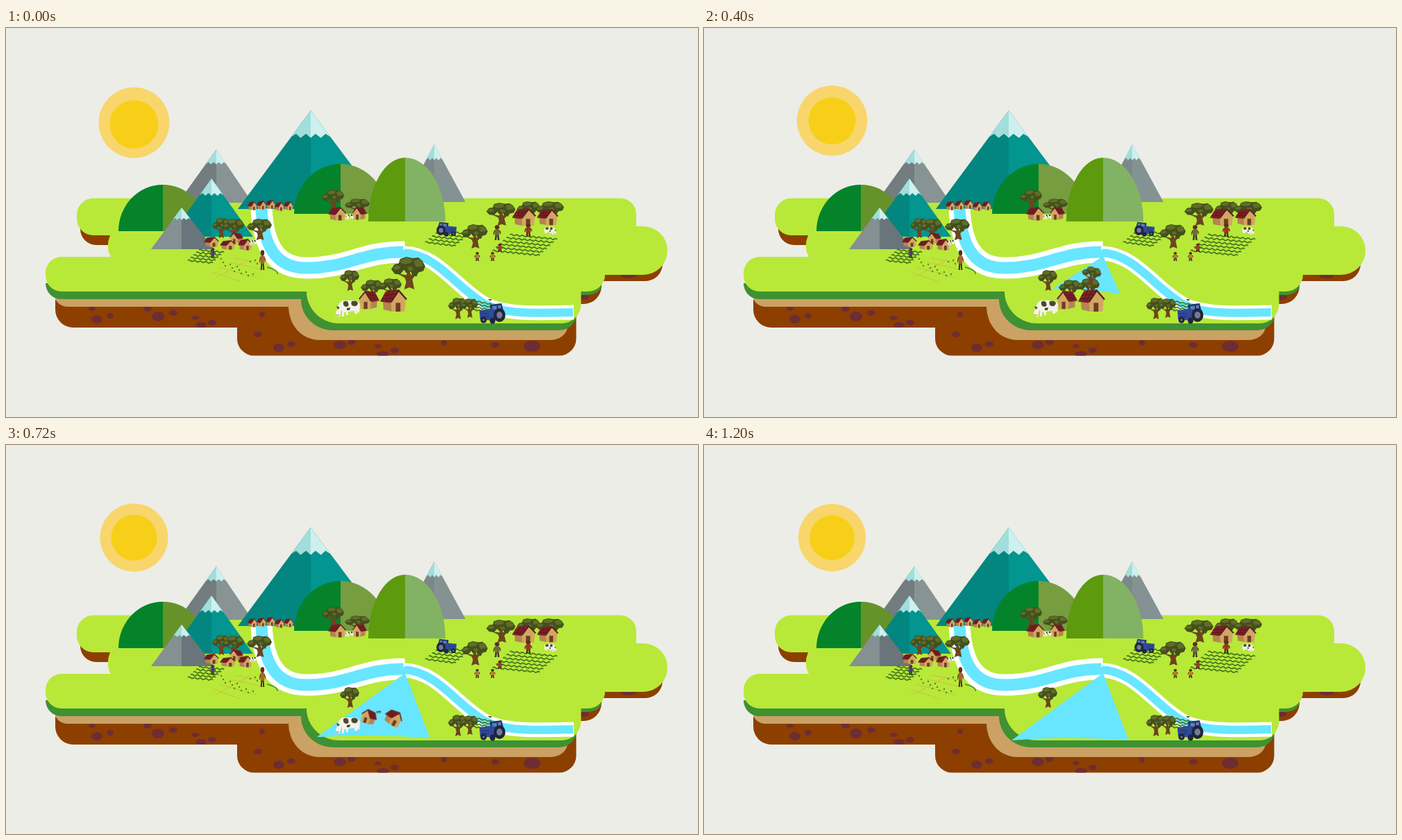
Write an HTML page that moves like this. It is 997 by 561 pixels and loops after 1240 ms.

```html
<!DOCTYPE html>
<html lang="en">
<head>
<meta charset="utf-8">
<title>Valley flood</title>
<style>
html, body { margin: 0; width: 100%; height: 100%; overflow: hidden; background: #ecede7; }
svg { display: block; width: 100vw; height: 100vh; }
.halo, .disc, .flood, .out { animation: 1240ms linear infinite; }
.out { transform-box: fill-box; transform-origin: center; }
.halo { animation-name: halo; }
.disc { animation-name: disc; }
.flood { animation-name: flood; }
.oak { animation-name: oak; }
.grove { animation-name: grove; }
.cabin { animation-name: cabin; }
.barn { animation-name: barn; }
.ox { animation-name: ox; }
@keyframes halo {
  0% { cy: 136.5px; r: 51px; }
  12.9% { cy: 134.5px; r: 50px; }
  32.26% { cy: 133.6px; r: 50.7px; }
  51.61% { cy: 133.6px; r: 49.2px; }
  67.74% { cy: 133.6px; r: 48.8px; }
  80.65% { cy: 133.6px; r: 49.3px; }
  96.77%, 100% { cy: 133.6px; r: 48.6px; }
}
@keyframes disc {
  0% { cy: 139px; r: 35px; }
  12.9% { cy: 135.6px; r: 32.5px; }
  32.26% { cy: 133.8px; r: 34px; }
  51.61% { cy: 133.6px; r: 33.5px; }
  67.74% { cy: 133.7px; r: 32.6px; }
  80.65% { cy: 133.8px; r: 32.2px; }
  96.77%, 100% { cy: 133.7px; r: 32.4px; }
}
@keyframes flood {
  0% { d: path("M575 325 L560 328 Q568 329 575 329 Z"); }
  12.9% { d: path("M575 329 L541 338 Q560 337 577 341 Z"); }
  32.26% { d: path("M575 329 L502 376 Q552 375 600 384 Z"); }
  51.61% { d: path("M575 329 L451 418 Q530 414 610 420 Z"); }
  67.74%, 100% { d: path("M575 329 L443 426 Q527 419 612 426 Z"); }
}
@keyframes oak {
  0%, 12.9% { transform: none; }
  32.26% { transform: translate(-22px, 4px) scale(.58) rotate(12deg); }
  45%, 100% { transform: translate(-32px, 6px) scale(0) rotate(25deg); }
}
@keyframes grove {
  0%, 34% { transform: none; }
  51.61% { transform: translate(-3px, 7px) scale(.4); }
  61%, 100% { transform: translate(-4px, 9px) scale(0); }
}
@keyframes cabin {
  0%, 53% { transform: none; }
  67.74% { transform: scale(.42) rotate(50deg); }
  78%, 100% { transform: scale(0) rotate(90deg); }
}
@keyframes barn {
  0%, 52% { transform: none; }
  67.74% { transform: scale(.2) rotate(70deg); }
  73%, 100% { transform: scale(0) rotate(90deg); }
}
@keyframes ox {
  0%, 58% { transform: none; }
  67.74% { transform: translateX(2px) rotate(25deg); }
  80.65% { transform: translate(1px, 2px) scale(.52) rotate(70deg); }
  91%, 100% { transform: scale(0) rotate(90deg); }
}
</style>
</head>
<body>
<svg viewBox="0 0 997 561" xmlns="http://www.w3.org/2000/svg">
  <defs>
    <symbol id="tree" viewBox="0 0 50 48" preserveAspectRatio="none">
      <path d="M19 48 L22 37 L20 31 L8 24 L22 27 L26 18 L29 27 L41 20 L31 33 L34 48 L27 45 Z" fill="#6b451f"/>
      <path d="M0 18 L5 11 L11 10 L13 3 L22 0 L32 2 L40 1 L46 6 L50 14 L47 21 L40 23 L37 29 L31 27 L29 22 L22 24 L19 19 L13 26 L5 25 Z" fill="#444f1b"/>
      <path d="M13 5 L23 1 L31 4 L29 9 L20 11 L14 9 Z M33 6 L41 3 L47 9 L46 14 L36 15 Z M2 16 L8 12 L14 14 L11 19 L4 19 Z M23 15 L30 14 L33 19 L26 21 Z" fill="#5f6c2b"/>
    </symbol>
    <symbol id="house" viewBox="0 0 40 34" preserveAspectRatio="none">
      <path d="M4 15 L18 15 V33 L5 30 Z" fill="#b4854e"/>
      <path d="M16 18 L28 3 L38 15 L36 33 H17 Z" fill="#d3a562"/>
      <path d="M0 18 L8 3 L28 0 L15 20 Z" fill="#7d2126"/>
      <path d="M5 9 L23 7 M2 14 L19 13 M14 2 L8 18 M21 1 L12 18" stroke="#55151c" fill="none"/>
      <path d="M27 1 L39 15 M28 1 L16 19" stroke="#571f1c" stroke-width="2.4"/>
      <path d="M23 20 H30 V33 H23 Z" fill="#6b3e20"/>
    </symbol>
    <symbol id="cow" viewBox="0 0 36 27" preserveAspectRatio="none">
      <path d="M9 16 V25 H12 V19 H15 V23 H18 V18 L27 17 V21 H31 L32 18 L34 20 L35 8 Q33 1 24 2 L10 2 Q4 5 3 12 L0 20 Q1 26 6 25 L8 16 Z" fill="#f4f2ea"/>
      <path d="M11 4 Q16 1 18 5 Q20 11 15 11 Q10 10 11 4 M23 3 Q31 1 32 6 Q31 11 26 10 Q21 9 23 3 M16 13 l5 -1 l-1 4 l-4 0 M1 10 l5 2 l-3 3" fill="#4b4932"/>
      <path d="M1 23 l4 0" stroke="#dca7a0" stroke-width="2"/>
    </symbol>
    <symbol id="person" viewBox="0 0 10 22" preserveAspectRatio="none">
      <path d="M4 13 L3 22 M6 13 L7 22" stroke="#40302a" stroke-width="2.2"/>
      <path d="M2 7 Q5 4 8 7 L8 15 H2 Z" fill="currentColor"/>
      <path d="M2 8 L0 14 M8 8 L10 13" stroke="#70401f" stroke-width="1.6"/>
      <circle cx="5" cy="3.2" r="3" fill="#5a301b"/>
    </symbol>
    <symbol id="tractor" viewBox="0 0 40 31" preserveAspectRatio="none">
      <path d="M16 3 L33 1 L36 13 H17 Z" fill="#24376f"/>
      <path d="M20 5 H26 V11 H19 Z M28 4 H32 V10 H28 Z" fill="#5f7fb8"/>
      <path d="M1 11 L19 9 L37 12 V22 L20 26 L2 24 Z" fill="#2f4b98"/>
      <path d="M3 16 H15 M4 20 H15" stroke="#243a7a" stroke-width="1.5"/>
      <g fill="#21253c"><ellipse cx="30" cy="18" rx="8.5" ry="10"/><circle cx="7" cy="25" r="4.5"/><ellipse cx="20" cy="26" rx="4" ry="4.5"/></g>
      <g fill="#727b9c"><ellipse cx="30" cy="18" rx="4.2" ry="5"/><circle cx="7" cy="25" r="1.6"/></g>
    </symbol>
    <clipPath id="soil">
      <path id="earth" d="M71 392 V406 A26 26 0 0 0 97 432 H333 V448 A24.5 24.5 0 0 0 357.500 472.500 H797 A24.500 24.500 0 0 0 821.500 448 V398 H832 A26 26 0 0 0 858 372 V365 H921 A25 25 0 0 0 946 340 H800 V385 Z M107 285 V290 A23 23 0 0 0 130 313 H160 V285 Z"/>
    </clipPath>
  </defs>

  <rect width="997" height="561" fill="#ecede7"/>
  <circle class="halo" cx="184.5" cy="136.5" r="51" fill="#f8d66c"/>
  <circle class="disc" cx="184.5" cy="139" r="35" fill="#f7cf18"/>

  <use href="#earth" fill="#8d3f00"/>
  <g id="rocks" clip-path="url(#soil)" fill="#6e2d33"/>
  <path d="M70 385 A19 17 0 0 0 89 402 H407 A44 48 0 0 0 451 450 H784 A25 20 0 0 0 809 430 L800 400 H450 L425 385 Z" fill="#cba164"/>
  <path d="M57 368 A22 23 0 0 0 79 391 H425 A46 45 0 0 0 471 436 H797 A25 24 0 0 0 822 412 L828 385 H838 Q855 384 858 372 H800 L450 370 Z" fill="#3f9132"/>
  <path d="M126 245.500 H885 A23 23 0 0 1 908 268.500 V286 H918 A35 35 0 0 1 918 356 H863 A25 24 0 0 1 838 380 H828.500 V398 A28 28 0 0 1 800 426 H480 A47 46 0 0 1 433 380 H80 A23 23 0 0 1 57 357 V353 A23 23 0 0 1 80 330 H151 Q143 316 150 299 H126 A24 24 0 0 1 102 275 V269.500 A24 24 0 0 1 126 245.500 Z" fill="#b8e938"/>

  <g id="hills"/>

  <g fill="none">
    <path id="bend" d="M368 261 C371 316 390 346 432 346 C490 347 515 322 574 323" stroke="#fff" stroke-width="31"/>
    <path d="M368 261 C371 316 390 346 432 346 C490 347 515 322 574 323" stroke="#68e6ff" stroke-width="17"/>
    <path d="M574 325 C621 326 648 374 690 398 C720 414 770 411 818 410" stroke="#fff" stroke-width="21"/>
    <path d="M572 324 C621 326 648 374 690 398 C720 414 770 411 817 410" stroke="#68e6ff" stroke-width="12"/>
    <path d="M573.5 308 V320" stroke="#fff" stroke-width="2"/>
  </g>
  <path class="flood" d="M575 325 L560 328 Q568 329 575 329 Z" fill="#68e6ff"/>

  <g id="fields" fill="none" stroke="#44761d" stroke-width="1.7"/>
  <g fill="none" stroke="#d0b84a" stroke-width=".9">
    <path d="M298 352 L338 366 M306 345 L362 360 M322 338 L372 349 M328 332 L362 338 M302 360 L350 334"/>
    <path d="M376 345 Q392 349 391 355" stroke="#3f9132" stroke-width="1.6"/>
  </g>
  <g id="sprouts" fill="#4f8a1f"/>
  <g id="scene"/>

  <g class="out grove">
    <use href="#tree" x="511" y="363" width="32" height="30"/>
    <use href="#tree" x="537" y="361" width="33" height="30"/>
  </g>
  <g class="out oak"><use href="#tree" x="555" y="330" width="49" height="47"/></g>
  <g class="out cabin"><use href="#house" x="508" y="379" width="30" height="27" transform="matrix(-1 0 0 1 1046 0)"/></g>
  <g class="out barn"><use href="#house" x="539" y="377" width="39" height="33"/></g>
  <g class="out ox"><use href="#cow" x="475" y="391" width="36" height="27"/></g>
</svg>
<script>
const $ = id => document.getElementById(id);
const poly = (fill, ...pts) => `<polygon fill="${fill}" points="${pts.join(' ')}"/>`;

// Mountain with a jagged snow cap c pixels deep
function peak(x, y, l, r, base, c, dark, light) {
  const half = (end, rock, snow) => {
    const w = (end - x) * c / (base - y);
    const at = (fx, fy) => [x + w * fx, y + c * fy];
    return poly(rock, [x, y], [end, base], [x, base]) +
      poly(snow, [x, y], at(1, 1), at(.75, .88), at(.52, 1.04), at(.24, .88), at(0, 1.04));
  };
  return half(l, dark, '#a1dedc') + half(r, light, '#cef0ee');
}

function hill(x, y, l, r, base, dark, light) {
  const half = (end, fill) => `<path fill="${fill}" d="M${x} ${y} A${Math.abs(end - x)} ${base - y} 0 0 ${end > x ? 1 : 0} ${end} ${base} H${x} Z"/>`;
  return half(l, dark) + half(r, light);
}

$('hills').innerHTML =
  peak(303, 175, 248, 355, 252, 21, '#737c7e', '#879493') +
  peak(617, 168, 573, 662, 251, 22, '#7c8789', '#849293') +
  peak(439, 119, 334, 545, 261, 38, '#02867f', '#03958f') +
  hill(226, 226, 162, 290, 293, '#04832a', '#65932a') +
  hill(482, 196, 415, 549, 268, '#04832a', '#769d40') +
  hill(575, 187, 522, 633, 279, '#5d9a0d', '#82b263') +
  peak(296, 217, 236, 356, 301, 24, '#02867f', '#03958f') +
  peak(253, 259, 209, 300, 319, 17, '#849092', '#69757a');

$('rocks').innerHTML = [
  [131, 420, 8, 6], [150, 415, 5, 4], [124, 405, 5, 3], [204, 405, 6, 4], [219, 416, 9, 7],
  [241, 411, 6, 4], [273, 418, 6, 3], [281, 428, 8, 4], [297, 425, 6, 4], [369, 413, 4, 4],
  [363, 442, 6, 4], [393, 461, 8, 6], [411, 456, 6, 4], [481, 457, 9, 6], [498, 453, 6, 4],
  [536, 459, 5, 3], [543, 470, 9, 4], [560, 465, 6, 4], [631, 454, 4, 4], [705, 457, 6, 4],
  [758, 459, 12, 8], [831, 388, 9, 4], [897, 357, 11, 4]
].map(([x, y, a, b]) => `<ellipse cx="${x}" cy="${y}" rx="${a}" ry="${b}"/>`).join('');

// Rows of crops: wavy lines, each shifted by (dx, dy)
function field(x, y, len, n, dx, dy, slope) {
  let d = '';
  for (let i = 0; i < n; i++)
    d += `M${x + i * dx} ${y + i * dy} q2 ${slope - 2} 4 ${slope}` + ` t4 ${slope}`.repeat(len / 4);
  return `<path d="${d}"/>`;
}
$('fields').innerHTML =
  field(278, 320, 34, 5, -4, 3.8, .4) +
  field(624, 292, 40, 5, -5, 4.2, .5) +
  field(726, 298, 66, 6, -5, 4.6, .4) +
  field(672, 393, 26, 4, 0, 4.2, .8);

let sprouts = '';
for (let i = 0; i < 15; i++)
  sprouts += `<circle cx="${310 + i * 23 % 56}" cy="${333 + i * 11 % 25}" r="1.2"/>`;
$('sprouts').innerHTML = sprouts;

const put = (id, x, y, w, h, color = '#000') =>
  `<use href="#${id}" x="${x}" y="${y}" width="${w}" height="${h}" color="${color}"/>`;
const flip = (id, x, y, w, h) => `<g transform="matrix(-1 0 0 1 ${2 * x + w} 0)">${put(id, x, y, w, h)}</g>`;

let row = '';
for (let i = 0; i < 5; i++) row += put('house', 348 + i * 13, 248 + (i * 3 + 2) % 4, 14, 13);

$('scene').innerHTML = row +
  put('tree', 297, 274, 25, 29) + put('tree', 312, 275, 31, 30) + put('tree', 347, 275, 36, 31) +
  put('house', 285, 301, 22, 15) + flip('house', 322, 295, 20, 16) +
  put('house', 308, 306, 23, 14) + put('house', 334, 304, 21, 17) + put('cow', 351, 305, 10, 9) +
  put('person', 294, 317, 8, 15, '#34428c') + put('person', 365, 320, 9, 29, '#ac6432') +
  put('tree', 455, 233, 32, 30) + put('tree', 488, 246, 36, 25) +
  put('house', 464, 258, 26, 20) + flip('house', 499, 258, 21, 19) + put('cow', 489, 268, 12, 9) +
  flip('tractor', 619, 279, 31, 22) + put('tree', 656, 283, 38, 35) +
  put('tree', 692, 252, 42, 33) + put('tree', 736, 250, 34, 29) + put('tree', 763, 250, 41, 30) +
  put('house', 729, 260, 35, 26) + put('house', 765, 261, 31, 24) + flip('cow', 775, 286, 18, 13) +
  put('person', 702, 284, 11, 22, '#66703a') + put('person', 747, 282, 11, 19, '#a52f2b') +
  put('person', 675, 323, 8, 13, '#b78035') + put('person', 697, 323, 8, 13, '#d57b27') +
  put('person', 707, 311, 9, 12, '#a33a2a') +
  put('tree', 481, 349, 28, 30) + put('tree', 637, 389, 27, 31) + put('tree', 655, 390, 25, 28) +
  put('tractor', 681, 396, 40, 31) + '<path d="M694 391 l6 0 l-2 3" fill="#675230"/>';
</script>
</body>
</html>
```
